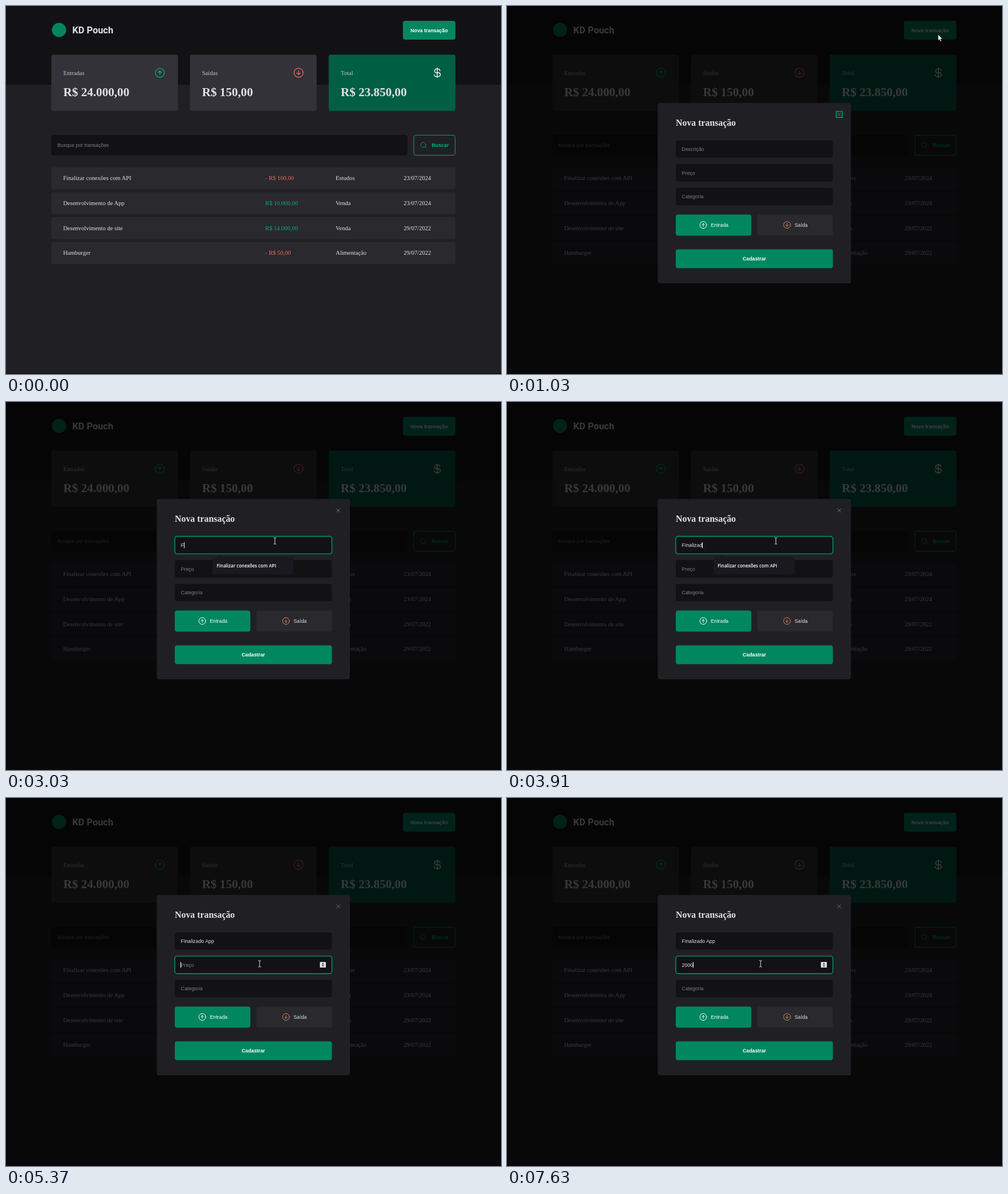
Write an HTML page that moves like this. It is 868 px wide and 645 px high and loops after 8 s.

```html
<!DOCTYPE html>
<html lang="pt-BR">
<head>
<meta charset="utf-8">
<title>Transações</title>
<style>
  html, body { margin: 0; width: 100%; height: 100%; overflow: hidden; background: #202024; }
  svg { display: block; width: 868px; height: 645px; }
  text { white-space: pre; fill: #e1e1e6; }
  .serif { font: 10.58px "Liberation Serif", Times, serif; }
  .sum { font: bold 21.16px "Liberation Serif", Times, serif; }
  .heading { font: bold 15.87px "Liberation Serif", Times, serif; }
  .sans { font: 8.815px "Liberation Sans", Arial, sans-serif; }
  .bold { font-weight: bold; }
  .brand { font: bold 16.4px Roboto, sans-serif; }
  .hint { font: 600 8px "Open Sans", sans-serif; fill: #fff; }
  .icon { fill: none; stroke-width: 16; stroke-linecap: round; stroke-linejoin: round; }
</style>
</head>
<body>
<svg id="stage" viewBox="0 0 868 645"></svg>
<script>
const LOOP = 8000, BLINK = 530;
const GREEN = '#00875f', LIGHT_GREEN = '#00b37e', DARK_GREEN = '#015f43';
const RED = '#ee695d', GRAY = '#7c7c8a', INK = '#121214', WHITE = '#e1e1e6';

const rect = (x, y, w, h, fill, extra = 'rx="4"') =>
  `<rect x="${x}" y="${y}" width="${w}" height="${h}" fill="${fill}" ${extra}/>`;
const text = (x, y, cls, str, fill = WHITE, extra = '') =>
  `<text x="${x}" y="${y}" class="${cls}" style="fill:${fill}" ${extra}>${str}</text>`;

// Icons are drawn on a 256-unit grid and centred on (x, y).
const ICONS = {
  up: '<circle cx="128" cy="128" r="96"/><path d="M94 122l34-34 34 34M128 168V88"/>',
  down: '<circle cx="128" cy="128" r="96"/><path d="M94 134l34 34 34-34M128 88v80"/>',
  dollar: '<path d="M128 24v208M184 88a40 40 0 0 0-40-40h-32a40 40 0 0 0 0 80h40a40 40 0 0 1 0 80h-48a40 40 0 0 1-40-40"/>',
  search: '<circle cx="116" cy="116" r="84"/><path d="M175 175l49 49"/>',
  close: '<path d="M200 56L56 200M200 200L56 56"/>'
};
const icon = (name, x, y, size, color) =>
  `<g class="icon" stroke="${color}" transform="translate(${x} ${y}) scale(${size / 256}) translate(-128 -128)">${ICONS[name]}</g>`;

const card = (x, label, sum, name, color, fill = '#323238') =>
  rect(x, 85.2, 222.1, 98.5, fill) +
  text(x + 21.1, 120.5, 'serif', label, '#c4c4cc') +
  text(x + 21.1, 157.5, 'sum', sum) +
  icon(name, x + 190.4, 117, 21.16, color);

const row = ([title, price, kind, date], i) => {
  const top = 282.8 + i * 43.66, base = top + 22.5;
  return rect(79.4, top, 708.6, 38.4, '#29292e') +
    text(100.2, base, 'serif', title) +
    text(454.6, base, 'serif', price, price[0] === '-' ? RED : LIGHT_GREEN) +
    text(578, base, 'serif', kind) +
    text(697.2, base, 'serif', date);
};

const field = (id, top, label) =>
  rect(296, top, 275.5, 30.6, INK, `rx="4" id="${id}Box"`) +
  text(306.6, top + 18.6, 'sans', label, GRAY, `id="${id}Label"`) +
  text(306.6, top + 18.6, 'sans', '', WHITE, `id="${id}Value"`);

const rows = [
  ['Finalizar conexões com API', '- R$ 100,00', 'Estudos', '23/07/2024'],
  ['Desenvolvimento de App', 'R$ 10.000,00', 'Venda', '23/07/2024'],
  ['Desenvolvimento de site', 'R$ 14.000,00', 'Venda', '29/07/2022'],
  ['Hamburger', '- R$ 50,00', 'Alimentação', '29/07/2022']
];

document.getElementById('stage').innerHTML =
  rect(0, 0, 868, 645, '#202024', '') +
  rect(0, 0, 868, 138, INK, '') +
  `<circle cx="93" cy="42" r="12.5" fill="${GREEN}"/>` +
  text(116.3, 48, 'brand', 'KD Pouch') +
  rect(696, 26, 92, 33, GREEN, 'rx="4" id="newButton"') +
  text(742, 45.7, 'sans bold', 'Nova transação', '#fff', 'text-anchor="middle"') +
  card(79.4, 'Entradas', 'R$ 24.000,00', 'up', LIGHT_GREEN) +
  card(322.6, 'Saídas', 'R$ 150,00', 'down', RED) +
  card(565.9, 'Total', 'R$ 23.850,00', 'dollar', '#fff', DARK_GREEN) +
  rect(79.4, 226, 624.6, 36, INK) +
  text(90, 247.2, 'sans', 'Busque por transações', GRAY) +
  rect(715, 226.4, 72.6, 35.2, 'none', `rx="4" stroke="${LIGHT_GREEN}" stroke-width=".9"`) +
  icon('search', 732.3, 244, 13.2, LIGHT_GREEN) +
  text(746.5, 247.2, 'sans bold', 'Buscar', LIGHT_GREEN) +
  rows.map(row).join('') +
  '<g id="modal">' +
    rect(0, 0, 868, 645, '#000', 'opacity=".75"') +
    rect(264.4, 170, 338.6, 316, '#202024') +
    text(296, 210.2, 'heading', 'Nova transação') +
    rect(577.3, 184.8, 10.6, 10.6, 'none', `id="closeRing" stroke="${LIGHT_GREEN}" stroke-width="1.2"`) +
    icon('close', 582.6, 190.1, 10.58, '#9a9aa4') +
    field('name', 235.5, 'Descrição') +
    field('price', 277.1, 'Preço') +
    field('kind', 318.7, 'Categoria') +
    rect(296, 365.4, 132.4, 37.2, GREEN) +
    icon('up', 344.2, 383.8, 15.87, '#fff') +
    text(357.4, 387, 'sans', 'Entrada', '#fff') +
    rect(439, 365.4, 132.5, 37.2, '#29292e') +
    icon('down', 491, 383.8, 15.87, '#d98a5c') +
    text(504.2, 387, 'sans', 'Saída') +
    rect(296, 426.4, 275.5, 33, GREEN) +
    text(433.7, 445.6, 'sans bold', 'Cadastrar', '#fff', 'text-anchor="middle"') +
    '<g id="spinner">' + rect(550.5, 287.5, 10.3, 9.6, '#f0f0f0', '') +
      '<path d="M553.2 291.4l2.5-2.6 2.5 2.6zM553.2 293.2l2.5 2.6 2.5-2.6z" fill="#333"/></g>' +
    '<g id="hints"><path d="M371 272.5l4-3.5 4 3.5z" fill="#19191f"/>' +
      rect(362, 272, 142, 30, '#19191f', 'rx="3" id="hintBox"') +
      text(369.6, 290.2, 'hint', '', '#fff', 'id="hint1"') +
      text(369.6, 313.2, 'hint', '', '#fff', 'id="hint2"') + '</g>' +
    rect(0, 0, 1, 10.4, '#fff', 'id="caret"') +
  '</g>' +
  rect(0, 644, 868, 1, '#0b0b0c', '') +
  '<path id="arrow" d="M0 0v10.6l2.4-2.2 1.7 3.8 1.8-.8-1.7-3.7h3.3z" fill="#fff" stroke="#111" stroke-width=".6"/>' +
  '<path id="beam" d="M-2.5-5.5h1.9l.6.6.6-.6h1.9M0-5v10M-2.5 5.5h1.9l.6-.6.6.6h1.9" fill="none" stroke="#ddd"/>';

const el = {};
document.querySelectorAll('[id]').forEach(node => el[node.id] = node);
const show = (node, on) => node.setAttribute('visibility', on ? 'inherit' : 'hidden');
const set = (node, attrs) => Object.entries(attrs).forEach(([k, v]) => node.setAttribute(k, v));
const clamp = v => Math.max(0, Math.min(1, v));

const NAME = 'FInalizado App', PRICE = '2000';
const NAME_KEYS = [3030, 3170, 3310, 3400, 3490, 3590, 3680, 3770, 3910, 4040, 4110, 4310, 4570, 4700];
const PRICE_KEYS = [6890, 7350, 7500, 7630];
const FOCUS_NAME = 1630, FOCUS_PRICE = 5370, OPEN = 1030;

const MOVES = [
  [70, 830, [843, 626], [756, 50]],
  [1094, 1360, [756, 50], [471.5, 243.5]],
  [4964, 5300, [471.5, 243.5], [444.7, 290.5]]
];
const TICK = 67;

function pointer(t) {
  const [start, end, from, to] = MOVES.filter(m => t >= m[0]).pop() || MOVES[0];
  const stepped = t >= end ? end : start + Math.floor((t - start) / TICK) * TICK;
  const p = clamp((stepped - start) / (end - start));
  const eased = p * p * (3 - 2 * p);
  return from.map((v, i) => v + (to[i] - v) * eased);
}

function focusField(id, on) {
  set(el[id + 'Box'], { stroke: on ? '#009b6b' : 'none', 'stroke-width': 1.4 });
}

function render(t) {
  const open = t >= OPEN;
  const onName = t >= FOCUS_NAME && t < FOCUS_PRICE, onPrice = t >= FOCUS_PRICE;
  const [x, y] = pointer(t);

  const hover = open ? 0 : clamp((t - 740) / 160);
  const mix = (a, b) => Math.round(a + (b - a) * hover);
  set(el.newButton, {
    fill: `rgb(${mix(0, 1)},${mix(135, 95)},${mix(95, 67)})`,
    stroke: t >= 900 && !open ? GREEN : 'none', 'stroke-width': 1.4
  });

  show(el.modal, open);
  show(el.closeRing, t < FOCUS_NAME);
  focusField('name', onName);
  focusField('price', onPrice);

  const typed = keys => keys.filter(k => t >= k).length;
  const name = NAME.slice(0, typed(NAME_KEYS)), price = PRICE.slice(0, typed(PRICE_KEYS));
  el.nameValue.textContent = name;
  el.priceValue.textContent = price;
  show(el.nameLabel, !name);
  show(el.priceLabel, !price);

  const active = onPrice ? el.priceValue : el.nameValue;
  const lastKey = [FOCUS_NAME, ...NAME_KEYS, FOCUS_PRICE, ...PRICE_KEYS].filter(k => t >= k).pop();
  const lit = Math.floor((t - lastKey) / BLINK) % 2 === 0;
  show(el.caret, (onName || onPrice) && lit);
  const width = active.textContent ? active.getComputedTextLength() : 0;
  set(el.caret, { x: Math.round(306.6 + width - .2), y: onPrice ? 287.3 : 245.8 });

  const filtered = name.length > 0;
  show(el.hints, t >= 1690 && t < 3970);
  set(el.hintBox, { height: filtered ? 30 : 53 });
  el.hint1.textContent = rows[filtered ? 0 : 1][0];
  el.hint2.textContent = filtered ? '' : rows[0][0];

  const inField = top => open && x > 296 && x < 571 && y > top && y < top + 31;
  const text = inField(235) || inField(277);
  show(el.spinner, onPrice || inField(277));
  show(el.arrow, t >= 70 && !text);
  show(el.beam, text);
  [el.arrow, el.beam].forEach(n => set(n, { transform: `translate(${x} ${y})` }));
}

const began = performance.now();
function frame() {
  render((performance.now() - began) % LOOP);
  requestAnimationFrame(frame);
}
frame();
</script>
</body>
</html>
```
